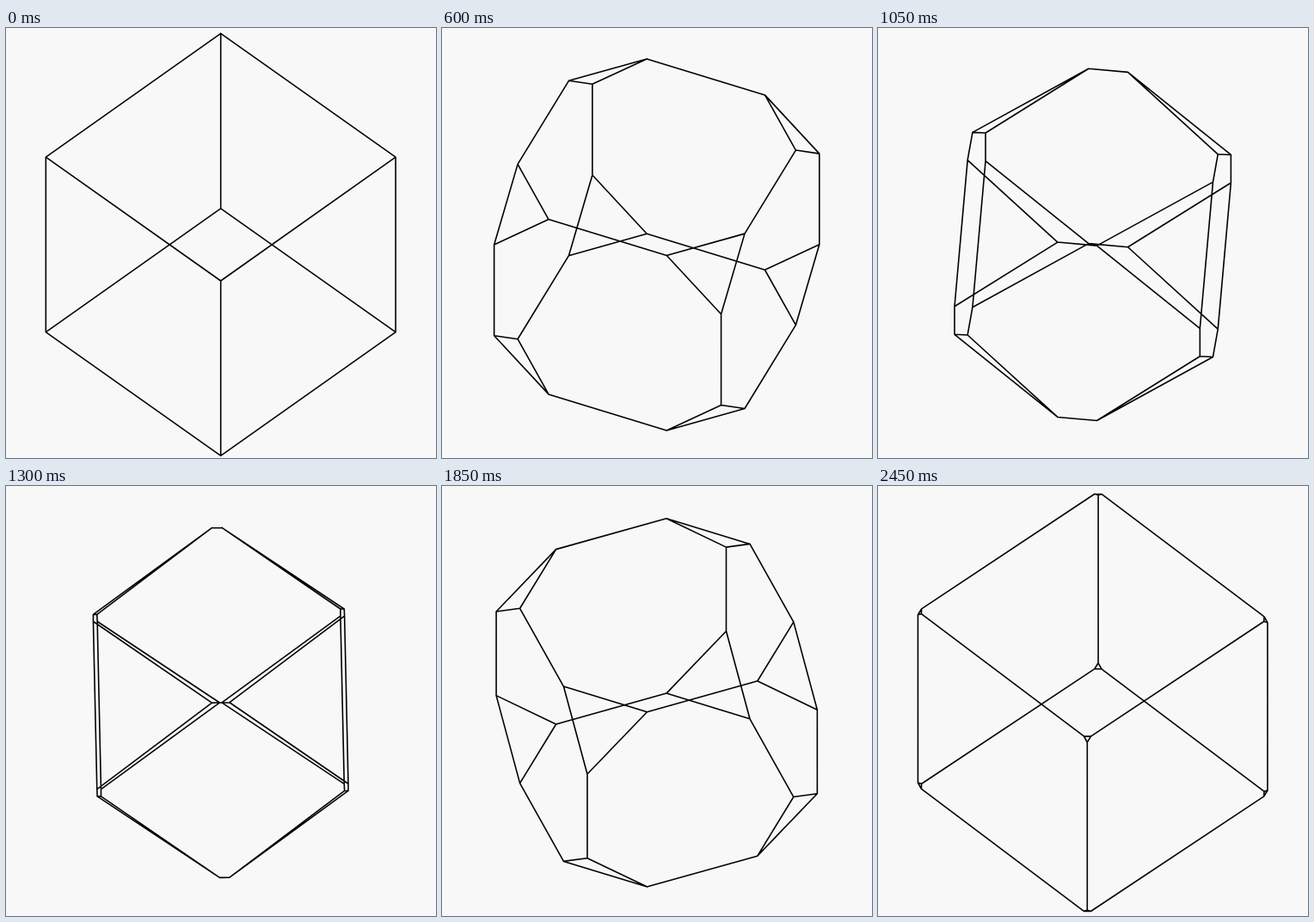
Write an HTML page with a canvas that moves like this. It is 500 px wide and 500 px high and loops after 2500 ms.

```html
<!DOCTYPE html>
<html lang="en">
<head>
<meta charset="utf-8">
<title>Truncating cube</title>
<style>
  html, body { margin: 0; width: 100%; height: 100%; overflow: hidden; background: #f8f8f8; }
  canvas { display: block; }
</style>
</head>
<body>
<canvas id="stage" width="500" height="500"></canvas>
<script>
const ctx = document.getElementById('stage').getContext('2d');
const FRAMES = 50, STEP = 50;
const HALF = 143.8;          // half the side of the cube
const CENTER = [249.7, 251.9];
const TILT = Math.SQRT1_2;   // sine and cosine of the 45 degree tilt

const corners = Array.from({ length: 8 }, (_, i) =>
  [1, 2, 4].map(bit => (i & bit ? HALF : -HALF)));

// Orthographic view of a point turned about the vertical axis.
function project([x, y, z], angle) {
  const c = Math.cos(angle), s = Math.sin(angle);
  const across = x * c - y * s, depth = x * s + y * c;
  return [CENTER[0] + across, CENTER[1] - TILT * (depth + z)];
}

const mix = (a, b, t) => a.map((v, k) => v + (b[k] - v) * t);

function draw(frame) {
  const phase = frame / FRAMES;
  const cut = Math.min(phase, 1 - phase);
  const angle = Math.PI / 4 + phase * Math.PI / 2;
  const cutPoint = (i, bit) => project(mix(corners[i], corners[i ^ bit], cut), angle);

  ctx.fillStyle = '#f8f8f8';
  ctx.fillRect(0, 0, 500, 500);
  ctx.strokeStyle = '#000';
  ctx.lineWidth = 1.6;
  ctx.lineCap = ctx.lineJoin = 'round';
  ctx.beginPath();
  for (let i = 0; i < 8; i++) {
    const triangle = [1, 2, 4].map(bit => cutPoint(i, bit));
    if (cut > 0) {
      triangle.forEach((p, k) => k ? ctx.lineTo(...p) : ctx.moveTo(...p));
      ctx.closePath();
    }
    // What is left of each cube edge, drawn once.
    [1, 2, 4].forEach((bit, k) => {
      if (i & bit || cut === 0.5) return;
      ctx.moveTo(...triangle[k]);
      ctx.lineTo(...cutPoint(i ^ bit, bit));
    });
  }
  ctx.stroke();
}

const start = performance.now();
function tick() {
  draw(Math.floor((performance.now() - start) / STEP) % FRAMES);
  requestAnimationFrame(tick);
}
tick();
</script>
</body>
</html>
```
